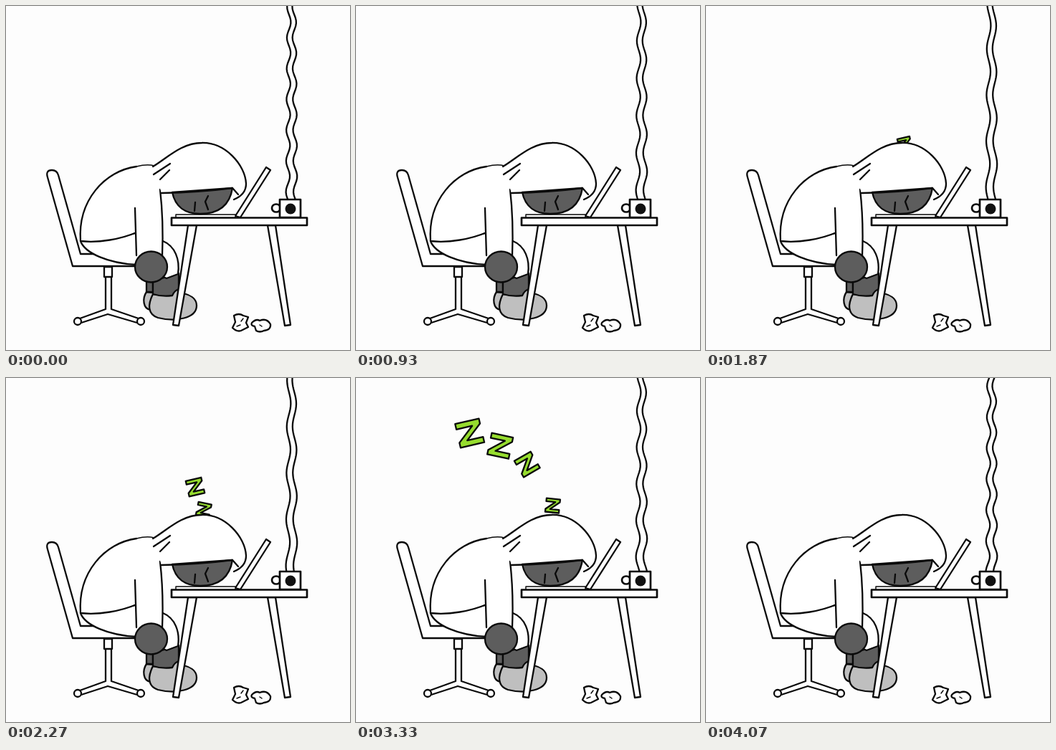
Recreate the animation shown at these times as an HTML page. Size 480x480 px, loop 4.19 s.

```html
<!DOCTYPE html>
<html lang="en">
<head>
<meta charset="utf-8">
<title>Asleep at the desk</title>
<style>
html, body { margin: 0; width: 100%; height: 100%; overflow: hidden; background: #fdfdfd; }
svg { display: block; width: 100vw; height: 100vh; }
g { fill: #fff; stroke: #0a0a0a; stroke-width: 2.3; stroke-linejoin: round; stroke-linecap: round; }
.line { fill: none; }
.dark { fill: #5d5d5d; }
.shoe { fill: #bfbfbf; }
.thin { stroke-width: 1.5; }
.bold { stroke-width: 2.7; }
#zs { fill: #96dc2e; }
</style>
</head>
<body>
<svg viewBox="0 0 480 480">
  <g>
    <path id="steam" />

    <!-- chair -->
    <path d="M182 363H93L58 239Q55 229 64 229Q71 229 73 236L104 346H182" />
    <path d="M139 376V423L103 436L105 442L142 430L183 442L185 436L147 423V376Z" />
    <path d="M137 364H148V378H137Z" />
    <circle cx="100" cy="440" r="5" />
    <circle cx="188" cy="440" r="5" />

    <!-- legs and shoes -->
    <path class="shoe" d="M196 399C190 408 191 423 202 424L206 400Z" />
    <path class="dark" d="M196 384H205V399H196Z" />
    <path class="shoe" d="M205 402C198 416 197 430 212 435C237 441 266 436 266 418C266 408 256 403 248 401Q246 393 240 395L225 404Z" />
    <path class="dark" d="M205 384L224 378L241 373V395Q235 397 232 404Q218 406 205 402Z" />
    <path d="M104 328C110 345 143 359 182 361L224 380L240 374C243 354 236 335 219 328L180 317Z" />

    <!-- back and arm -->
    <path stroke="none" d="M104 328C100 270 138 228 190 222L215 228L217 300L182 316C161 325 130 331 104 328Z" />
    <path class="line" d="M182 316C161 325 130 331 104 328C100 271 138 230 182 224" />
    <path class="line thin" d="M182 224Q197 220 207 223" />
    <path stroke="none" d="M180 282L182 348H218Q220 300 214 256Z" />
    <path class="line" d="M180 282L182 348M215 256Q220 300 218 348" />
    <ellipse class="dark" cx="202.5" cy="364" rx="22.5" ry="21.5" />
  </g>

  <g id="zs"></g>

  <g>
    <!-- table -->
    <path d="M254 306L233 445L241 446L266 306ZM365 306L389 446L397 445L376 306Z" />
    <path class="bold" d="M231 295.5H420V306H231Z" />

    <!-- laptop -->
    <path d="M320 293L363 225L369 229L327 295Z" />
    <path class="thin" d="M237 291H320V295H237Z" />

    <!-- hood and face -->
    <path stroke="none" d="M205 224C225 212 245 191 273 191C306 190 334 222 335 248Q335 261 322 267L316 254L217 261Z" />
    <path class="line" d="M205 224C225 212 245 191 273 191C306 190 334 222 335 248Q335 263 318 270" />
    <path class="dark" d="M232 260C236 280 250 290 271 290C296 290 312 279 316 254Z" />
    <path class="line" d="M217 261Q270 260 316 254L324 263M264 274L263 286M282 265L278 273L282 284M229 220L206 235M228 229L215 242" />

    <!-- mug -->
    <ellipse class="bold" cx="377" cy="282" rx="6" ry="5.5" />
    <path class="bold" d="M382 270H411V295H382Z" />
    <circle cx="397" cy="283" r="7.5" fill="#111" stroke="none" />

    <!-- crumpled paper -->
    <path d="M318 432Q325 428 331 432L338 434L335 442L338 448L328 453Q322 455 316 449L320 441Z" />
    <path class="line thin" d="M331 436L328 440M322 447L327 445" />
    <path d="M343 442Q349 436 354 439Q364 435 369 444Q370 452 360 453Q354 456 349 453L347 447Q341 446 343 442Z" />
    <path class="line thin" d="M354 445L357 447" />
  </g>
</svg>
<script>
const LOOP = 4190, MUG = 270, RISE = 1870;
const steam = document.getElementById('steam');
const zLayer = document.getElementById('zs');
const Z = 'M-12-12H12V-7L-4 6.5H12V12H-12V7L4-6.5H-12Z';

// The letters follow one curve from the hood to the upper left
const start = { x: 278, y: 198 }, bend = { x: 268, y: 94 }, end = { x: 100, y: 62 };
const letters = [
  { birth: 1820, tilt: -13 },
  { birth: 2140, tilt: 12 },
  { birth: 2510, tilt: -30 },
  { birth: 3145, tilt: 6 }
];

for (const letter of letters) {
  letter.node = document.createElementNS('http://www.w3.org/2000/svg', 'path');
  letter.node.setAttribute('d', Z);
  letter.node.setAttribute('vector-effect', 'non-scaling-stroke');
  zLayer.append(letter.node);
}

const curve = (axis, u) =>
  (1 - u) ** 2 * start[axis] + 2 * u * (1 - u) * bend[axis] + u * u * end[axis];

function drawSteam(t) {
  const cycle = 2 * Math.PI * t / LOOP;
  const length = 54 - 11 * Math.cos(cycle);
  const left = [], right = [];
  for (let y = -4; y <= MUG + 2; y += 4) {
    const half = 3.6 + 1.7 * Math.max(0, y) / MUG;
    const x = 398.5 + 2.7 * Math.sin(2 * Math.PI * (y - MUG) / length + 9 * cycle);
    left.push(`${x - half} ${y}`);
    right.unshift(`${x + half} ${y}`);
  }
  steam.setAttribute('d', `M${left.join('L')}L${right.join('L')}`);
}

function drawLetters(t) {
  const shrink = Math.max(0, Math.min(1, (3980 - t) / 180));
  for (const { birth, tilt, node } of letters) {
    const u = Math.min(1, (t - birth) / RISE);
    const shown = u >= 0 && shrink > 0;
    node.style.display = shown ? '' : 'none';
    if (!shown) continue;
    const scale = (17 + 21 * u) / 24 * shrink;
    node.setAttribute('transform',
      `translate(${curve('x', u)} ${curve('y', u)}) rotate(${tilt}) scale(${scale})`);
  }
}

function frame() {
  const t = performance.now() % LOOP;
  drawSteam(t);
  drawLetters(t);
  requestAnimationFrame(frame);
}
frame();
</script>
</body>
</html>
```
